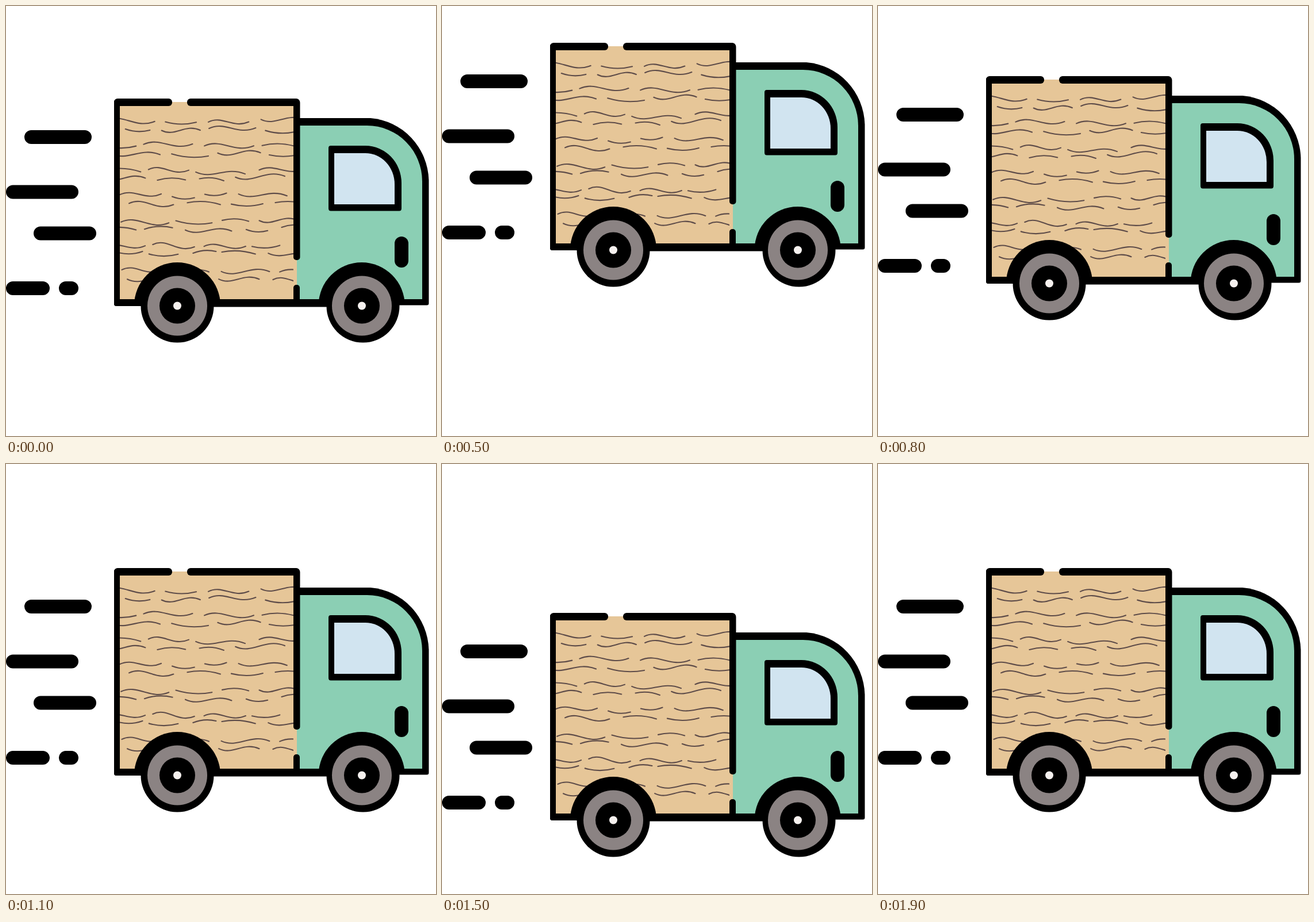
These frames come from a looping animation (748 px wide and 748 px high, 2000 ms). An HTML page:

```html
<!DOCTYPE html>
<html lang="en">
<head>
<meta charset="utf-8">
<title>Bouncing truck</title>
<style>
  html, body { margin: 0; width: 100%; height: 100%; overflow: hidden; background: #fff; }
  svg { display: block; width: 100%; height: 100%; }
</style>
</head>
<body>
<svg viewBox="0 0 748 748">
  <defs>
    <clipPath id="panel"><rect x="198" y="174" width="302" height="336"/></clipPath>
    <clipPath id="aboveFloor"><rect x="188" y="430" width="547" height="88"/></clipPath>
    <g id="hub">
      <circle r="52" fill="#8b8383"/>
      <circle r="31"/>
      <circle r="7" fill="#f6f1ef"/>
    </g>
  </defs>
  <g id="truck">
    <!-- speed lines -->
    <path d="M44 228H137M12 323.5H114M60 395.5H145M12 491H64M104 491H114"
          stroke="#000" stroke-width="24" stroke-linecap="round"/>

    <!-- cargo box -->
    <path d="M193 167H506V512H193Z" fill="#e6c698"/>
    <path id="grain" clip-path="url(#panel)" fill="none" stroke="#5e4c49"
          stroke-width="2.1" stroke-linecap="round"/>

    <!-- cab -->
    <path d="M506 195H634A110 112 0 0 1 735.5 303V517Q735.5 520.5 732 520.5H506Z"/>
    <path d="M506 208H628A96 97 0 0 1 724 305V510H506Z" fill="#8bcfb4"/>
    <path d="M565 243H625A63 65 0 0 1 688 308V352Q688 356.5 684 356.5H565Q561 356.5 561 352V247Q561 243 565 243Z"/>
    <path d="M571 256H625A51 54 0 0 1 676 310V345H571Z" fill="#d1e4f0"/>
    <rect x="676" y="401" width="24" height="54" rx="12"/>

    <!-- frame -->
    <rect x="188" y="161" width="101" height="13" rx="6"/>
    <rect x="315" y="161" width="196" height="13" rx="6"/>
    <rect x="188" y="163" width="10" height="359" rx="4"/>
    <rect x="500" y="163" width="11.5" height="279" rx="5"/>
    <rect x="500" y="485" width="11" height="35" rx="5"/>
    <rect x="188" y="510" width="372" height="12" rx="4"/>
    <rect x="355" y="510" width="210" height="13.5"/>

    <!-- wheels -->
    <g clip-path="url(#aboveFloor)">
      <circle cx="298" cy="521" r="75"/>
      <circle cx="618.7" cy="521" r="75"/>
    </g>
    <circle cx="298" cy="522" r="63.5"/>
    <circle cx="621" cy="522" r="63.5"/>
    <use href="#hub" x="298" y="521.5"/>
    <use href="#hub" x="619" y="521.5"/>
  </g>
</svg>
<script>
let seed = 7;
const random = (min, max) => {
  seed = seed * 16807 % 2147483647;
  return min + (max - min) * seed / 2147483647;
};

// One grain stroke: a shallow arc when short, a gentle wave when long.
function stroke(x, y, width) {
  const bend = (4 + width * .06) * (random(0, 1) < .5 ? 1 : -1);
  const rise = random(-3, 4);
  return `M${x} ${y}` + (width < 65
    ? `q${width / 2} ${rise / 2 - bend} ${width} ${rise}`
    : `c${width * .35} ${-bend * 1.5} ${width * .6} ${bend * 1.5 + rise} ${width} ${rise}`);
}

// Seven bands of two staggered lines of strokes.
let grain = '';
for (let band = 0; band < 7; band++) {
  for (const line of [0, 1]) {
    let x = 198 + random(-25, 18);
    while (x < 490) {
      const width = random(36, 90);
      grain += stroke(x, 200 + band * 43.3 + line * 14 + random(-3, 3), width);
      x += width + random(10, 26);
    }
  }
}
document.getElementById('grain').setAttribute('d', grain);

// Triangle bounce: twenty 100 ms steps of 19.5 px, snapped to whole pixels.
const truck = document.getElementById('truck');
const start = performance.now();
function draw() {
  const step = Math.floor((performance.now() - start) / 100) % 20;
  const offset = Math.round(19.5 * (5 - Math.abs((step + 15) % 20 - 10)));
  truck.setAttribute('transform', `translate(0 ${offset})`);
  requestAnimationFrame(draw);
}
draw();
</script>
</body>
</html>
```
